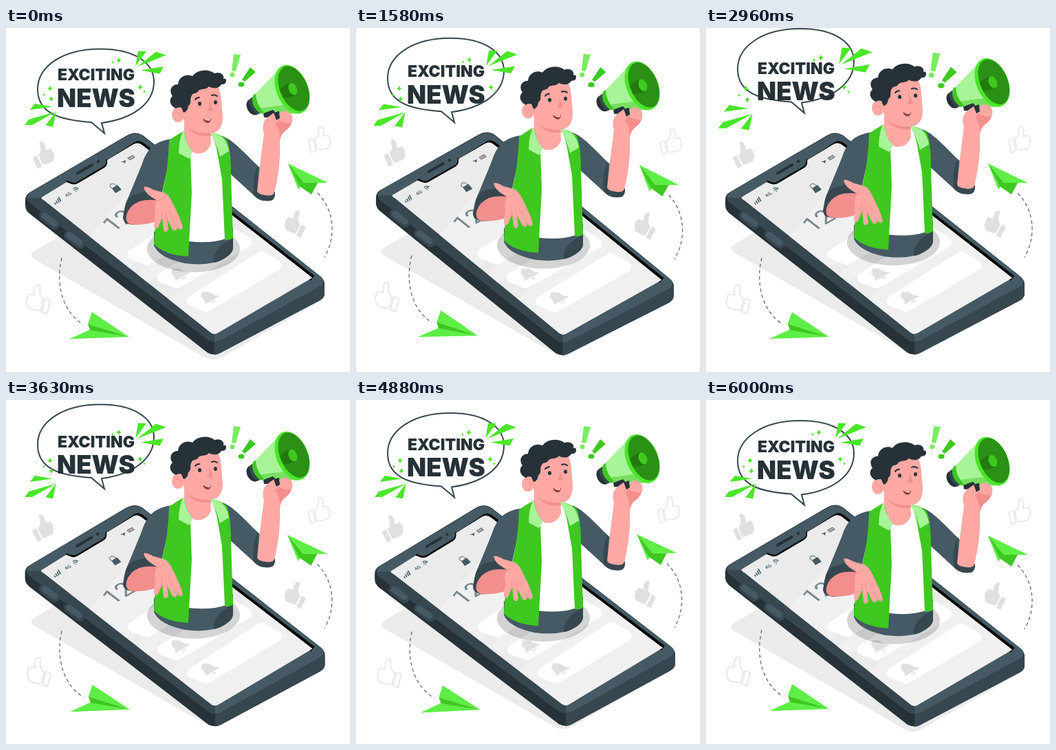
Animation of 500x500 px, one loop 6.04 s. Source, as an HTML page:

```html
<!DOCTYPE html>
<html lang="en">
<head>
<meta charset="utf-8">
<title>Exciting news</title>
<style>
html, body { margin: 0; width: 100%; height: 100%; overflow: hidden; background: #fff; }
svg { display: block; width: 100vw; height: 100vh; }
.title { font: 900 23px Inter, sans-serif; text-anchor: middle; fill: #263238; }
.ui { font-family: Roboto, sans-serif; }
.dark { fill: #263238; } .mid { fill: #37474f; } .navy { fill: #455a64; }
.skin { fill: #ffa8a4; } .shade { fill: #f28f8c; }
.green { fill: #4ae628; } .light { fill: #5eee45; } .vest { fill: #3ec820; } .pale { fill: #a8f498; }
.full { fill: #e0e0e0; } .open { fill: #fff; stroke: #e0e0e0; stroke-width: 1.2; }
.card { fill: #fff; stroke: #fff; stroke-width: 15; stroke-linejoin: round; }
.dash { fill: none; stroke: #455a64; stroke-width: 1.1; stroke-dasharray: 5 4; }
.line { fill: none; stroke: #263238; stroke-linecap: round; }
</style>
</head>
<body>
<svg viewBox="0 0 500 500">
<defs>
  <g id="thumb">
    <path d="M-15-1-8-2-7 16-14 17Z"/>
    <path d="M-6-1Q0-4 1-10L2-17Q4-20 7-17Q10-12 7-4H13Q16-3 15 0Q17 3 15 6Q16 9 13 11Q12 15 8 15H-1L-5 14Z"/>
  </g>
  <g id="bell" class="full" transform="matrix(.75 -.42 .62 .52 0 0)">
    <path d="M-13 7Q-9 4-9-2Q-9-12 0-12Q9-12 9-2Q9 4 14 7Q15 9 12 9H-11Q-14 9-13 7Z"/>
    <path d="M-5 11H5Q0 17-5 11Z"/><circle cy="-12" r="2.5"/>
  </g>
  <path id="spark" d="M0-4.5Q.7-.7 4 0Q.7.7 0 4.5Q-.7.7-4 0Q-.7-.7 0-4.5Z"/>
  <path id="screen" d="M52 246 88 224 96 227Q100 228 104 226L143 203Q148 200 147 192L185 169Q192 165 198 170L445 363 308 443Q303 446 298 443L56 251Q50 248 52 246Z"/>
  <clipPath id="glass"><use href="#screen"/></clipPath>
</defs>

<g id="thumbs">
  <use href="#thumb" class="full" transform="translate(53 184) rotate(-22)"/>
  <use href="#thumb" class="open" transform="translate(455 162) rotate(-8)"/>
  <use href="#thumb" class="open" transform="translate(48 394) scale(-1.1 1.1) rotate(-11)"/>
  <use href="#thumb" class="full" transform="translate(422 284) scale(-1 1) rotate(-24)"/>
</g>

<path id="shadow" fill="#ebebeb" d="M40 325 130 272 459 389Q463 393 456 398L313 479Q302 485 291 480L41 336Q33 331 40 325Z"/>

<g id="phone">
  <path class="dark" d="M28 250Q28 242 36 238L176 156Q188 149 199 156L457 361Q464 367 463 374V386Q463 392 456 396L312 472Q303 477 293 472L37 272Q28 266 28 258Z"/>
  <path class="mid" d="M303 456 314 453 463 370V386Q463 392 456 396L312 472Q307 475 303 475Z"/>
  <path class="navy" d="M35 239 176 157Q188 150 199 157L457 361Q466 368 457 375L314 453Q303 459 293 453L36 255Q26 247 35 239Z"/>
  <path class="mid" d="M31 247 52 247 303 446 303 456 293 453 36 255Z"/>
  <path d="M147 192 184 168Q192 161 200 167L448 360 443 367 300 255Z"/>
  <path fill="none" stroke="#000" stroke-width="3" d="M88 223 96 226Q100 227 104 225L143 202Q148 199 147 191"/>
  <use href="#screen" fill="#ebebeb"/>
  <g clip-path="url(#glass)">
    <g fill="#f0f0f0"><path d="M120 304 245 160 310 200 180 350Z"/><path d="M190 360 340 225 360 250 205 372Z"/><path d="M225 405 395 250 480 340 300 460Z"/></g>
    <g class="card">
      <path id="card" d="M270 397 371 332 393 345 291 405Z"/>
      <use href="#card" x="-43" y="-34"/><use href="#card" x="-86" y="-68"/>
    </g>
  </g>
  <use href="#bell" transform="translate(294 391)"/>
  <use href="#bell" transform="translate(251 357)"/>
  <path class="line" stroke-width="4" d="M104 211 125 199"/>
  <circle cx="134" cy="194" r="2.3" class="dark"/>
  <g class="line" stroke-width="14">
    <path style="stroke:#37474f" d="M55 273 71 286M91 301 108 314"/>
    <path style="stroke:#455a64" stroke-width="9" d="M56 273 71 284M92 301 107 312"/>
  </g>
  <g class="ui" fill="#455a64">
    <text font-size="7.5" font-weight="500" transform="matrix(.87 -.5 .65 .6 88 246)">4G</text>
    <text font-size="36" fill="#7d888d" transform="matrix(.87 -.5 .75 .58 155 297)">12</text>
  </g>
  <path class="line" stroke-width="1.6" style="stroke:#455a64" d="M72 256 71 254.500M74.500 254.500 73 251.500M77 253 75 248.500M79.500 251.500 76.500 246"/>
  <path class="line" stroke-width="1.2" style="stroke:#455a64" d="M98 234Q99 231 105 233M99.500 236Q101 233.500 104 235M102 237.500 102.500 237.500"/>
  <path class="navy" d="M167 195 174 192 173 197 171 195Z"/>
  <path fill="#aaa" stroke="#777" d="M177 189 184 185 187 188 180 192Z"/>
  <path class="navy" d="M154 233 162 228 168 235 159 240Z"/>
  <path class="line" stroke-width="1.5" style="stroke:#8b9499" d="M154 233Q149 229 153 227Q156 225 160 229"/>
</g>

<g id="person">
  <ellipse cx="272.5" cy="321" rx="67.5" ry="34" opacity=".17"/>
  <path class="navy" d="M215 296V316Q222 334 260 342Q298 347 319 334Q330 327 330 319V290Z"/>
  <path class="mid" d="M302 334Q305 318 330 305V319Q330 327 319 334Q310 340 302 341Z"/>

  <path class="navy" d="M242 161C216 164 205 176 198 197Q188 222 174 255L170 276Q173 287 190 286L222 260 238 190Z"/>
  <path class="mid" d="M171 270Q173 251 183 243Q205 235 224 239L224 250Q198 254 187 266L180 285Q168 284 171 270Z"/>
  <path class="shade" d="M175 272Q179 258 194 252Q206 248 224 251L219 281Q198 288 180 285Q173 282 175 272Z"/>

  <path class="navy" d="M314 157C332 163 350 186 369 203L366 240 391 238Q392 250 384 251Q369 253 361 244L326 212Z"/>
  <path class="mid" d="M366 200Q358 215 360 243Q369 253 384 251Q391 250 391 239L366 238Z"/>

  <path fill="#fff" d="M266 175 300 162 313 190 320 306Q298 314 265 310Z"/>
  <path class="skin" d="M259 135V158Q262 175 274 182Q291 185 298 169L297 148Z"/>
  <path class="shade" d="M262 142Q276 156 298 152V157Q275 160 262 142Z"/>
  <path class="vest" d="M258 150Q247 156 237 163Q236 206 226 244Q216 278 215 314Q230 330 265 332L270 240 268 184Z"/>
  <path class="vest" d="M299 152Q312 155 320 161Q327 172 327 215L330 305Q325 309 318 308L314 220 306 175Z"/>
  <path class="pale" d="M258 148Q251 162 251 182L266 190Q270 184 271 180Q261 169 258 148Z"/>
  <path class="pale" d="M295 150Q306 167 311 187L324 179Q322 166 314 158Z"/>

  <path class="skin" d="M200 231Q204 229 214 235L232 240Q239 246 243 256C249 268 255 280 257 290Q255 296 250 291L242 276 249 290Q248 297 242 293L234 278 236 293Q232 299 229 294L227 276 221 290Q216 295 215 287L217 269Q214 258 220 251L212 246Q202 240 200 231Z"/>
  <path class="line" stroke-width=".9" style="stroke:#f28f8c" d="M220 251Q228 250 230 246M227 276 226 265M234 278 231 267M242 276 237 266"/>

  <ellipse class="skin" cx="250" cy="126" rx="9" ry="11"/>
  <path class="skin" d="M259 88 300 76Q312 84 313 105L315 129Q315 147 303 152Q284 156 270 146Q256 139 256 120Z"/>
  <path class="line" stroke-width="1" style="stroke:#f28f8c" d="M246 123Q253 121 254 129"/>
  <path class="dark" d="M247 117C238 113 236 104 242 99C236 90 241 82 250 82C251 70 263 66 271 70C278 60 295 59 303 66C311 63 318 68 316 74Q320 72 320 77Q320 82 313 82C309 89 300 88 295 85C291 90 283 88 280 91C277 97 272 93 270 98C266 104 271 109 265 113Q264 122 258 123L255 116Q250 114 247 117Z"/>
  <g class="dark"><ellipse cx="281.500" cy="110" rx="2.5" ry="2.9"/><ellipse cx="304.500" cy="108" rx="2.4" ry="2.9"/></g>
  <path class="line" stroke-width="2" d="M275 104Q277 101 281 101M299 98Q303 96 307 99"/>
  <path class="shade" d="M295 106 301 119Q298 122 292 120Q297 118 295 106Z"/>
  <path fill="#9e3d3d" d="M286 132Q292 134 298 132Q297 139 292 138Q288 137 286 132Z"/>
  <path fill="#fff" d="M288 132.500Q293 134 297 132.500L296 134.500Q291 135 288 132.500Z"/>

  <g transform="translate(416 89) rotate(-23)">
    <path class="mid" d="M-58-12Q-72-10-71 3Q-69 15-57 14Z"/>
    <path class="dark" d="M-64-11Q-72-8-71 3Q-69 14-61 14Q-68 3-64-11Z"/>
    <path class="vest" d="M-56-14Q-66-2-56 15L-47 16V-16Z"/>
    <path class="pale" d="M-51-15Q-58 1-49 17L-4 37 0-37Z"/>
    <path fill="#78df61" d="M-53 7Q-52 14-49 17L-4 37-15 18Z"/>
    <ellipse class="green" rx="23" ry="37"/>
    <ellipse fill="#2b9015" cx="2.500" rx="20" ry="34.500"/>
    <path fill="#23780f" d="M-17-6Q-8-11 1-9V9Q-8 10-17 6Z"/>
    <ellipse class="vest" cx="1" rx="6" ry="9"/>
  </g>
  <path class="skin" d="M375 153Q370 139 380 130L390 122Q397 121 397 128L399 123Q406 118 411 123Q418 126 416 136Q413 145 404 151Q398 158 398 167C399 191 396 216 390 239Q388 245 377 243Q366 242 365 237L369 200Z"/>
  <path class="shade" d="M397 134Q407 140 415 138Q412 146 404 151Q399 156 398 163Q398 147 391 139Z"/>
  <path class="dark" d="M374 124 388 119 391 122 380 130 375 130ZM389 123 397 121 398 131 393 134Z"/>
</g>

<g id="shout">
  <path fill="#79ec62" d="M331 38 341 39 334 63 328 62Z"/><circle fill="#79ec62" cx="329" cy="68" r="3.500"/>
  <path class="vest" d="M355 57 363 64 347 78 343 75Z"/><ellipse class="vest" cx="342" cy="82" rx="4.500" ry="3.500"/>
</g>

<path id="bubble" fill="#fff" stroke="#37474f" stroke-width="2" d="M124 137C80 134 46 125 46 89C46 56 82 30.500 137 30.500C186 30.500 215 50 215 78C215 111 183 132 139 138L143 153Z"/>
<g id="burst" class="green">
  <path d="M34.600 119 42 110 67.500 114.500ZM27.400 141 33 133 72.800 121.600 38 141ZM57.400 141.600 68.300 143.500 72.800 121.600Z"/>
  <path d="M192 33.500 204 34 188.300 55.300ZM218 34.500 232.800 39.500 191 56.200ZM229 56 223.500 66.500 195.500 61.600Z"/>
  <use href="#spark" x="164" y="47"/><use href="#spark" x="64" y="88"/>
  <use href="#spark" x="66" y="103"/><use href="#spark" x="195" y="86"/>
  <g transform="scale(.5)"><use href="#spark" x="310" y="100"/><use href="#spark" x="110" y="194"/><use href="#spark" x="402" y="185"/></g>
</g>
<g id="words" class="title">
  <text x="131" y="76.500">EXCITING</text>
  <text x="131" y="115" style="font-size:36.500px">NEWS</text>
</g>

<g id="planes">
  <path class="dash" d="M453 240C478 265 480 304 463 333M81 334C71 378 85 414 112 431"/>
  <path class="light" d="M410 197 468 225 433 225ZM410 197 425 235 432 225Z"/>
  <path class="vest" d="M410 197 433 225 453 225 444 242 427 230Z"/>
  <path class="light" d="M125 413 179 449 119 430ZM92 452 123 438 179 449Z"/>
  <path class="vest" d="M119 430 179 449 122 439Z"/>
</g>
</svg>
<script>
const LOOP = 6040;
const WIND = [[0, 0], [.25, 1], [.75, -1], [1, 0]];
const BEAT = [[0, 1], [.1, 1.1], [.3, 1], [.4, 1], [.5, 1.1], [.6, 1], [1, 1]];

const move = (id, transform) => document.getElementById(id).setAttribute("transform", transform);

function track(keys, p) {
  const i = keys.findIndex(k => k[0] > p);
  const [a, from] = keys[i - 1], [b, to] = keys[i];
  return from + (to - from) * (p - a) / (b - a);
}

function frame(now) {
  const p = now % LOOP / LOOP;
  const lift = Math.abs(2 * p - 1) - 1;
  const turn = track(WIND, p), size = track(BEAT, p);
  const rise = (id, h) => move(id, `translate(0 ${lift * h})`);
  const sway = (id, x, y) => move(id, `rotate(${turn} ${x} ${y})`);
  const pulse = (id, x, y) => move(id, `translate(${x} ${y}) scale(${size}) translate(${-x} ${-y})`);
  rise("bubble", 30);
  for (const id of ["words", "person", "shadow"]) rise(id, 10);
  sway("phone", 246, 313);
  sway("thumbs", 250, 279);
  sway("planes", 276, 325);
  pulse("burst", 131, 88);
  pulse("shout", 345, 62);
  requestAnimationFrame(frame);
}
requestAnimationFrame(frame);
</script>
</body>
</html>
```
